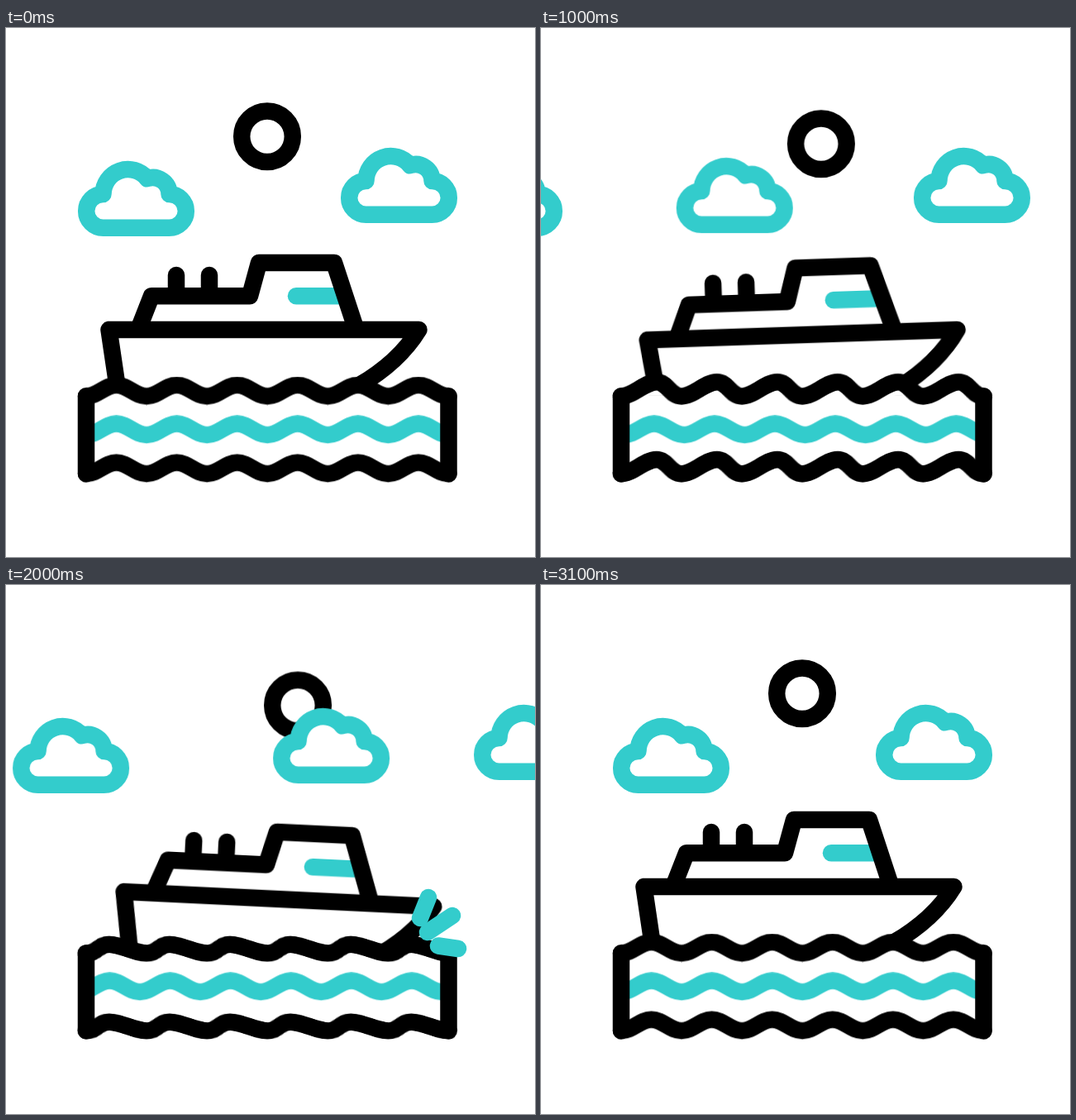
An HTML page for the animation above (3240 ms loop, 640x640 px).

```html
<!DOCTYPE html>
<html lang="en">
<head>
<meta charset="utf-8">
<title>Boat at sea</title>
<style>
  html, body { margin: 0; width: 100%; height: 100%; overflow: hidden; background: #fff; }
  svg {
    display: block; width: 640px; height: 640px;
    fill: none; stroke: #000; stroke-width: 20.5;
    stroke-linecap: round; stroke-linejoin: round;
  }
  .teal { stroke: #33cccc; }
  .cloud { fill: #fff; }
  .crest { vector-effect: non-scaling-stroke; }
  .land { fill: #fff; stroke: none; }

  .sun, .cloud, .boat, .crest, .splash {
    animation: 3240ms cubic-bezier(.333, 0, .667, 1) infinite both;
  }
  .sun { animation-name: sun; }
  .across { animation-name: across; }
  .leave { animation-name: leave; }
  .enter { animation-name: enter; }
  .boat { animation-name: boat; transform-origin: 312px 365px; }
  .crest { animation-name: lean; }
  .flow { animation: flow 3240ms linear infinite both; }
  .splash { animation-name: splash, blink; }

  @keyframes sun {
    0%, 1.85% { transform: translate(0, 0); }
    54.94% { transform: translate(40px, 15.6px); }
    95.68%, 100% { transform: translate(0, 0); }
  }
  @keyframes across {
    0%, 2.59% { transform: translate(0, 0); }
    91.17%, 100% { transform: translate(318px, -16px); }
  }
  @keyframes leave {
    0%, 5.19% { transform: translate(318px, -16px); }
    97%, 100% { transform: translate(558px, -16px); }
  }
  @keyframes enter {
    0%, 4.01% { transform: translate(-255px, 0); }
    95.68%, 100% { transform: translate(0, 0); }
  }
  @keyframes boat {
    0%, 1% { transform: translate(0, 0) rotate(0deg); }
    14.2% { transform: translate(6px, 3.5px) rotate(2deg); }
    30.86% { transform: translate(4.2px, 6.2px) rotate(-1.9deg); }
    50.62% { transform: translate(.5px, -2.5px) rotate(0deg); }
    61.73% { transform: translate(18px, 15px) rotate(2.75deg); }
    79.63%, 100% { transform: translate(0, 0) rotate(0deg); }
  }
  @keyframes lean {
    0%, 1.85% { transform: skewX(0deg) scaleY(1); }
    32.72% { transform: skewX(-19.5deg) scaleY(1.28); }
    58.64% { transform: skewX(40.5deg) scaleY(.78); }
    85.19%, 100% { transform: skewX(0deg) scaleY(1); }
  }
  @keyframes flow {
    0% { transform: translateX(0); }
    1.85% { transform: translateX(0); animation-timing-function: cubic-bezier(.333, 0, .667, .333); }
    8.95% { transform: translateX(-9.7px); }
    82.1% { transform: translateX(-210px); animation-timing-function: cubic-bezier(.333, .667, .667, 1); }
    88.89%, 100% { transform: translateX(-219.25px); }
  }
  @keyframes splash {
    0%, 56.79% { stroke-dashoffset: 1; }
    61.73% { stroke-dashoffset: 0; }
    67.28%, 100% { stroke-dashoffset: -1; }
  }
  @keyframes blink {
    0%, 56.79% { opacity: 0; }
    56.8%, 67.27% { opacity: 1; }
    67.28%, 100% { opacity: 0; }
  }
</style>
</head>
<body>
<svg viewBox="0 0 640 640">
  <defs>
    <path id="cloud" d="M117.5 241.7a20.3 20.3 0 0 1 0-40.6a30 30 0 0 1 53.3-18.9a20 20 0 0 1 26.7 18.9a20.3 20.3 0 0 1 0 40.6z"/>
    <clipPath id="tank"><rect x="97" y="440" width="438.5" height="100"/></clipPath>
  </defs>

  <circle class="sun" cx="316" cy="131.3" r="30.8"/>

  <g class="teal">
    <g class="cloud leave"><use href="#cloud"/></g>
    <g class="cloud across"><use href="#cloud"/></g>
    <g class="cloud enter"><use href="#cloud"/></g>
  </g>

  <g class="boat">
    <path class="teal" d="M351 324.3H404"/>
    <path d="M206 299V322M246 299V322"/>
    <path d="M162 360L176 324.3H295L306 284H397L422 360"/>
    <path d="M135 436L124.5 365H499.5C483 392 459 414 426 433"/>
  </g>

  <!-- water -->
  <rect class="land" x="97" y="445" width="438.5" height="94"/>
  <g clip-path="url(#tank)">
    <g transform="translate(97 492.3)"><path class="teal flow" data-waves="10"/></g>
  </g>
  <g transform="translate(97 445.5)"><path class="crest" fill="#fff" data-waves="6"/></g>
  <g transform="translate(97 539.3)"><path class="crest" data-waves="6"/></g>
  <path d="M97 445.5V539.3M535.5 445.5V539.3"/>

  <g class="teal" stroke-dasharray="1 3">
    <path class="splash" pathLength="1" d="M501 403L511 378"/>
    <path class="splash" pathLength="1" d="M510 420L540 400"/>
    <path class="splash" pathLength="1" d="M523 436.5L547 440"/>
  </g>
</svg>
<script>
  // One wave runs trough to crest to trough; the baseline is the trough.
  const half = 438.5 / 12, height = 13.4, handle = 14;
  const rise = dy => `c${handle} 0 ${half - handle} ${dy} ${half} ${dy}`;
  const wave = rise(-height) + rise(height);
  for (const path of document.querySelectorAll('[data-waves]')) {
    path.setAttribute('d', 'M0 0' + wave.repeat(+path.dataset.waves));
  }
</script>
</body>
</html>
```
